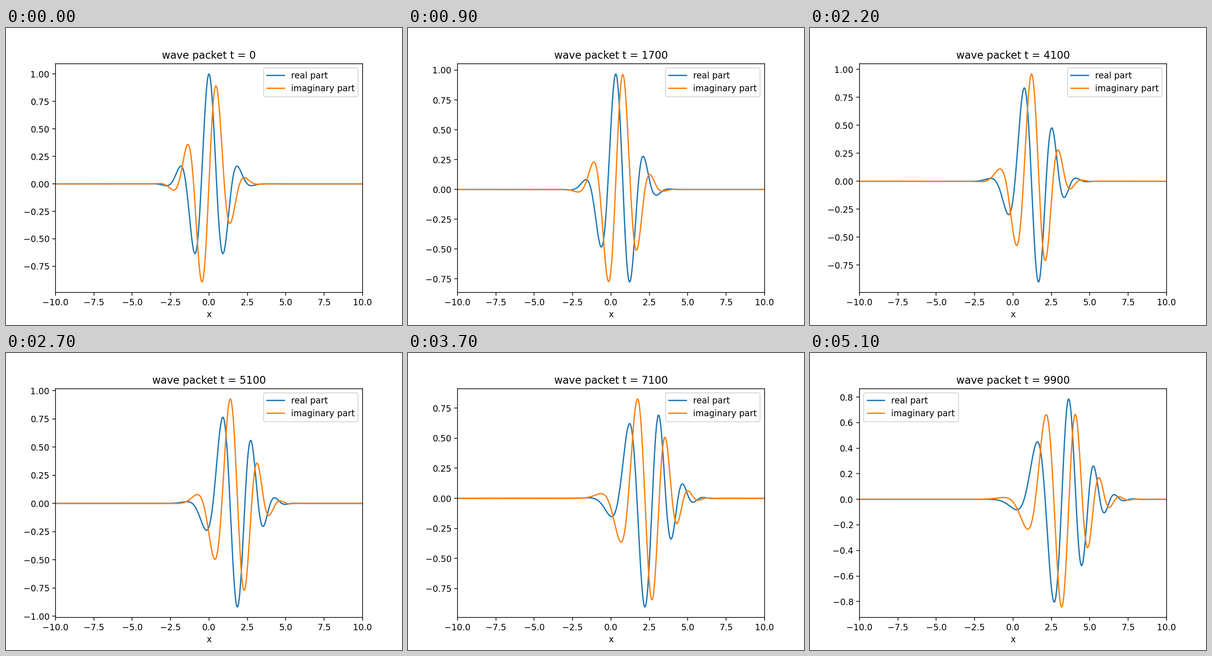
Recreate the animation shown at these times as a matplotlib script. Size 864x648 px, loop 5200 ms.

```python
import numpy as np
import matplotlib.pyplot as plt
from matplotlib.animation import FuncAnimation

FRAMES = 52
INTERVAL = 100   # ms
DT = 1e-4        # physical time per simulation step
K = np.pi        # mean wave number of the packet

x = np.linspace(-10, 10, 1001)


def psi(time):
    """Free Gaussian packet of unit width with hbar = m = 1."""
    spread = 1 + 1j * time
    phase = 1j * K * x - 0.5j * K**2 * time
    return np.exp((phase - x**2 / 2) / spread) / np.sqrt(spread)


def step_count(frame):
    """Simulation step shown; the pace dips at the start and once later."""
    lag = (frame > 0) + (frame > 12) + (frame > 13)
    return 100 * (2 * frame - lag)


fig, ax = plt.subplots(figsize=(6.4, 4.8), dpi=135)
real_line, = ax.plot(x, np.zeros_like(x), label="real part")
imag_line, = ax.plot(x, np.zeros_like(x), label="imaginary part")
title = ax.set_title("")
ax.set_xlabel("x")
ax.set_xlim(-10, 10)
ax.legend(loc="best")


def update(frame):
    step = step_count(frame)
    wave = psi(step * DT)
    real_line.set_ydata(wave.real)
    imag_line.set_ydata(wave.imag)
    title.set_text(f"wave packet t = {step}")
    ax.relim()
    ax.autoscale_view(scalex=False)
    return real_line, imag_line, title


anim = FuncAnimation(fig, update, frames=FRAMES, interval=INTERVAL,
                     repeat=True, repeat_delay=0, blit=False)
plt.show()
```
